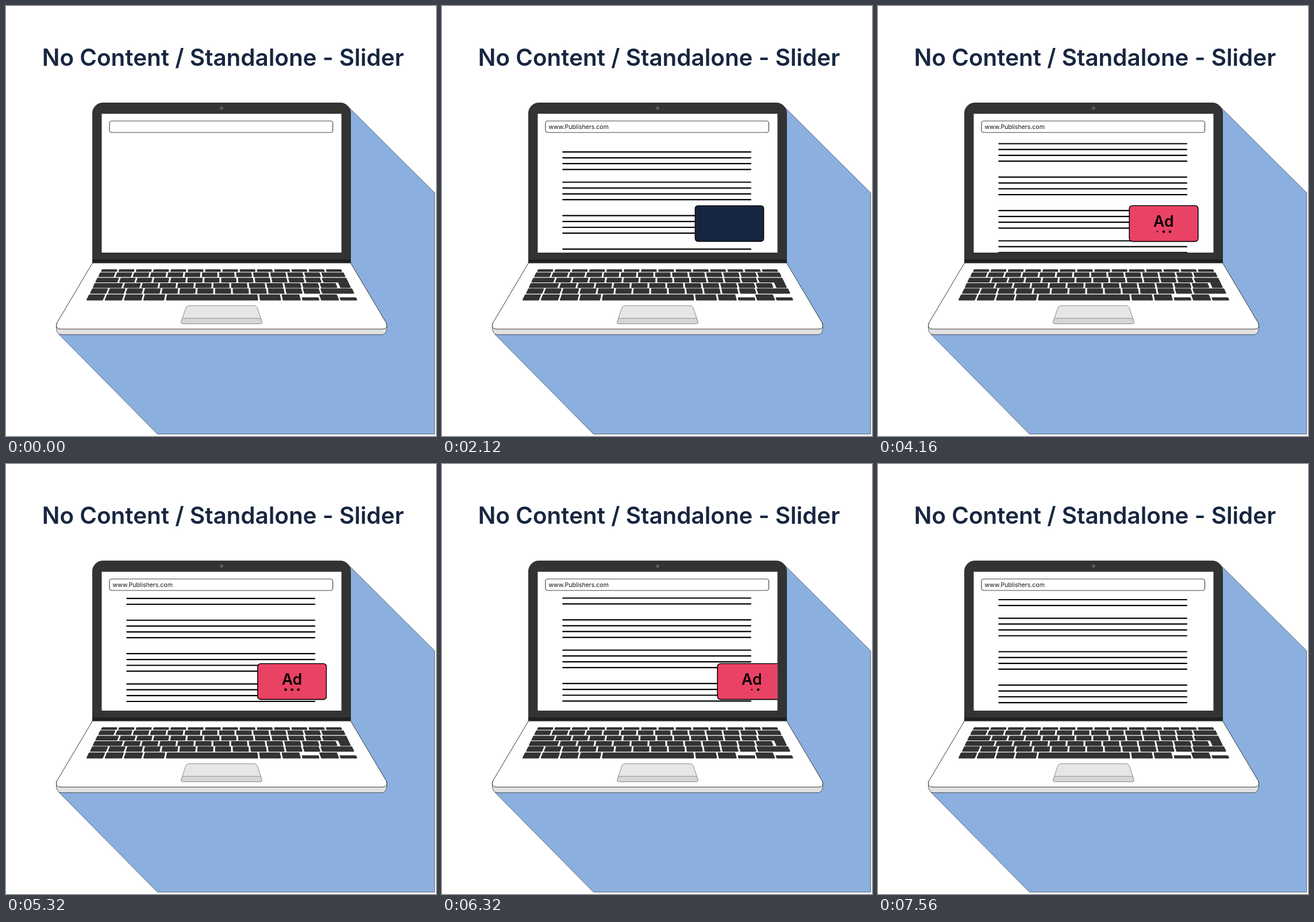
Animation of 748 by 748 pixels, one loop 7.6 s. Source, as an HTML page:

```html
<!DOCTYPE html>
<html lang="en">
<head>
<meta charset="utf-8">
<title>Standalone slider</title>
<style>
html, body { margin: 0; width: 100%; height: 100%; overflow: hidden; background: #fff; }
svg { display: block; width: 100vw; height: 100vh; }
text { font-family: Poppins, Inter, sans-serif; }
</style>
</head>
<body>
<svg viewBox="0 0 748 748">
  <defs>
    <clipPath id="screen"><rect x="166.5" y="187.5" width="417" height="241.5"/></clipPath>
    <clipPath id="page"><rect x="166.5" y="227" width="417" height="202"/></clipPath>
  </defs>
  <text x="377.5" y="103.5" text-anchor="middle" font-size="40.4" font-weight="600" fill="#172640">No Content / Standalone - Slider</text>

  <path d="M594 174L745.7 325V744.7H263.5L92 571L300 400Z" fill="#8bb0e0" stroke="#3c4654" stroke-width=".8"/>

  <path d="M150.5 447V186.500A18 18 0 0 1 168.500 168.500H581.500A18 18 0 0 1 599.500 186.500V447Z" fill="#333" stroke="#222" stroke-width=".8"/>
  <rect x="150.5" y="441" width="449" height="6" fill="#1f1f1f"/>
  <circle cx="375" cy="177.7" r="3" fill="#5a5a5a"/>
  <rect x="166.5" y="187.5" width="417" height="241.5" fill="#fff"/>

  <path d="M87.5 553V561Q89 571.700 96 571.700H654Q661 571.700 662.500 561V553Z" fill="#e2e2e2" stroke="#444" stroke-width=".9"/>
  <path d="M150.5 447H599.5L661.300 551Q665.500 562 655 562H95Q84.500 562 88.700 551Z" fill="#fff" stroke="#333"/>
  <path id="keys" fill="#333" stroke="#333" stroke-width="2.4" stroke-linejoin="round"/>
  <path d="M319 521.3H431Q436 521.3 437.5 526L445 549Q446 552.7 442 552.7H308Q304 552.7 305 549L312.5 526Q314 521.3 319 521.3Z" fill="#e6e6e6" stroke="#888"/>
  <path d="M307 543.3H443L445 549Q446 552.7 442 552.7H308Q304 552.7 305 549Z" fill="#d6d6d6" stroke="#888" stroke-width=".9"/>

  <rect x="180" y="200" width="388.5" height="20" rx="4" fill="#fff" stroke="#444" stroke-width="1.2"/>
  <text id="url" x="185.5" y="214.3" font-size="10.5" fill="#111"></text>

  <g clip-path="url(#page)"><path id="lines" fill="none" stroke="#000" stroke-width="2.2" stroke-linecap="round"/></g>

  <g clip-path="url(#screen)">
    <g id="card" stroke-width="1.3">
      <rect x="437.3" y="347.3" width="119.4" height="62.2" rx="5" fill="#172640" stroke="#000"/>
      <g id="ad">
        <rect x="437.3" y="347.3" width="119.4" height="62.2" rx="5" fill="#ea4264" stroke="#000"/>
        <text x="496.8" y="383.8" text-anchor="middle" font-size="26.5" font-weight="600">Ad</text>
        <circle cx="485.8" cy="392.5"/>
        <circle cx="497" cy="392.5"/>
        <circle cx="508" cy="392.5"/>
      </g>
    </g>
  </g>
</svg>
<script>
const LOOP = 7600, FRAME = 40, ADDRESS = 'www.Publishers.com';
const $ = id => document.getElementById(id);
const ramp = (t, a, b) => Math.min(1, Math.max(0, (t - a) / (b - a)));
const smooth = u => u * u * (3 - 2 * u);

// Keyboard: rows fan out from the centre line towards the viewer.
const half = y => 209 + 0.48 * (y - 458);
let keyPath = '';
function key(x0, x1, y0, y1, mid = (y0 + y1) / 2) {
  const at = (x, y) => `${375 + (x - 375) * half(y) / half(mid)} ${y}`;
  [x0, x1, y0, y1] = [x0 + 2.7, x1 - 2.7, y0 + 1.6, y1 - 1.6];
  keyPath += `M${at(x0, y0)}L${at(x1, y0)}L${at(x1, y1)}L${at(x0, y1)}Z`;
}
function row(y0, y1, left, right, first, count, last) {
  const sizes = [first, ...Array(count).fill(1), last];
  const unit = (right - left) / (first + count + last);
  let x = left;
  for (const s of sizes) key(x, x += s * unit, y0, y1);
}
row(457.6, 463, 164.5, 585.5, 1, 12, 1);
row(463, 472, 160.5, 590.5, 1, 12, 1.42);
row(472.3, 481.4, 155.5, 578.5, 1.4, 12, 1);
row(481.6, 490.8, 151, 576.5, 1.7, 11, 1);
row(490.9, 500.8, 146.5, 605.5, 1, 12, 1.9);
const edges = [140.5, 172, 205, 238.5, 277.5, 439.5, 479, 513];
edges.slice(1).forEach((x, i) => key(edges[i], x, 501.3, 512.7));
key(513.5, 546, 506.3, 512.7);
key(545, 579, 501.3, 512.7);
key(579.5, 611.5, 506.3, 512.7);
key(576.5, 597.5, 472.3, 490.8);
$('keys').setAttribute('d', keyPath);

// Page scroll: start, end, distance
const scrolls = [[2170, 3200, 55], [3360, 4960, 24], [4890, 6440, 74], [6860, 7760, 62]];
const gaps = [52.6, 58.2, 58.2];
function linePath(offset) {
  let d = '', top = 253.9 - offset;
  for (let g = 0; g < 8; top += gaps[g++ % 3])
    for (let i = 0; i < 4; i++) d += `M210.3 ${top + i * 10.15}H537`;
  return d;
}

const dots = document.querySelectorAll('#ad circle');
const DOTS_START = 2610, DOTS_CYCLE = 2040;
function dotSize(t, i) {
  const p = (t - DOTS_START - i * 120 + DOTS_CYCLE) % DOTS_CYCLE;
  return 2.3 * ramp(p, 0, 110) * (1 - ramp(p, 1490, 1620));
}

function draw(t) {
  $('url').textContent = ADDRESS.slice(0, Math.max(0, (t - 40) / FRAME));
  $('lines').setAttribute('d', linePath(scrolls.reduce((y, [a, b, h]) => y + h * smooth(ramp(t, a, b)), 0)));
  $('lines').setAttribute('opacity', ramp(t, 200, 1280));

  const shift = t < 4000 ? 3 * Math.exp((2120 - t) / 226) : 42 * Math.exp((t - 6320) / 235);
  $('card').setAttribute('transform', `translate(${Math.min(160, shift)})`);
  $('ad').setAttribute('opacity', ramp(t, 2200, 2600));
  dots.forEach((dot, i) => dot.setAttribute('r', t < DOTS_START ? 0 : dotSize(t, i)));
}

const start = performance.now();
function tick() {
  const t = (performance.now() - start) % LOOP;
  draw(Math.floor(t / FRAME) * FRAME);
  requestAnimationFrame(tick);
}
draw(0);
requestAnimationFrame(tick);
</script>
</body>
</html>
```
